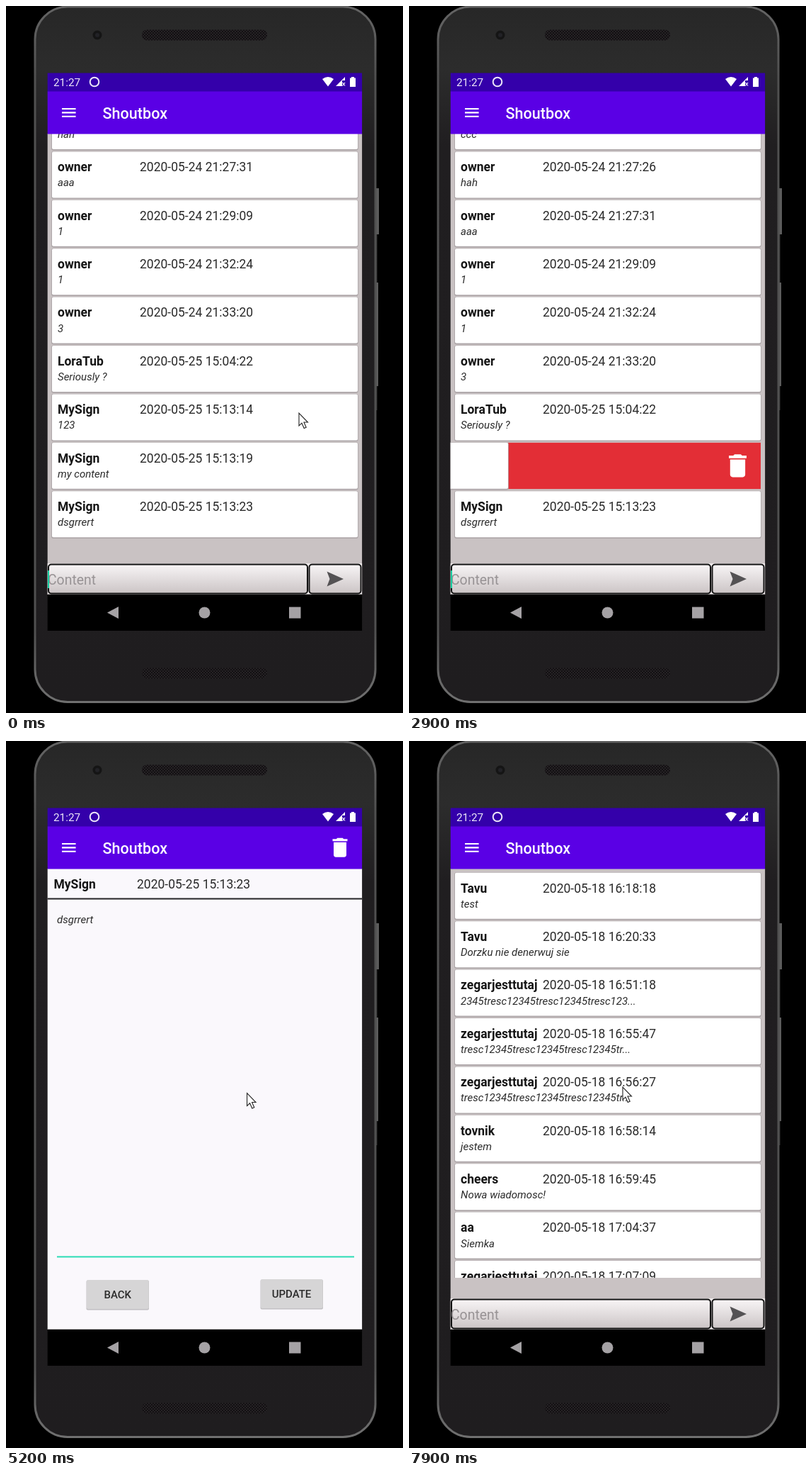
Recreate the animation shown at these times as an HTML page. Size 561 px wide and 997 px high, loop 8 s.

```html
<!DOCTYPE html>
<html lang="en">
<head>
<meta charset="utf-8">
<title>Shoutbox</title>
<style>
  html, body { margin: 0; width: 100%; height: 100%; overflow: hidden; background: #000; }
  svg { display: block; width: 100%; height: 100%; }
  text { font-family: Roboto, sans-serif; white-space: pre; }
  .name { font-size: 17.5px; font-weight: 700; fill: #151515; }
  .date { font-size: 17.5px; fill: #2b2b2b; }
  .message { font-size: 15px; font-style: italic; fill: #2b2b2b; }
  .button { font-size: 15px; font-weight: 500; fill: #2b2b2b; text-anchor: middle; }
</style>
</head>
<body>
<svg viewBox="0 0 561 997">
  <defs>
    <linearGradient id="body" x2="0" y2="1">
      <stop stop-color="#272727"/><stop offset=".09" stop-color="#2c2c2c"/>
      <stop offset=".2" stop-color="#201e20"/><stop offset="1" stop-color="#1f1d1f"/>
    </linearGradient>
    <linearGradient id="rim" x2="0" y2="1">
      <stop stop-color="#646464"/><stop offset=".1" stop-color="#505050"/>
      <stop offset=".9" stop-color="#505050"/><stop offset="1" stop-color="#707070"/>
    </linearGradient>
    <linearGradient id="field" x2="0" y2="1">
      <stop stop-color="#f8f5f6"/><stop offset="1" stop-color="#cbc4c5"/>
    </linearGradient>
    <pattern id="mesh" width="4" height="4" patternUnits="userSpaceOnUse">
      <rect width="4" height="4" fill="#121012"/>
      <path d="M0 0L4 4M4 0L0 4" stroke="#2b272a" stroke-width=".8"/>
    </pattern>
    <clipPath id="listArea"><rect x="58.7" y="180" width="444.4" height="577"/></clipPath>
    <path id="trash" fill="#fff" d="M6 19c0 1.1.9 2 2 2h8c1.1 0 2-.9 2-2V7H6zM19 4h-3.5l-1-1h-5l-1 1H5v2h14z"/>
  </defs>

  <!-- Phone -->
  <rect width="561" height="997"/>
  <path d="M525 257v65M524 390v146" stroke="#5c5c5c" stroke-width="4"/>
  <path d="M523.5 322v68M523.5 536v34" stroke="#353535" stroke-width="2"/>
  <rect x="41" y="1" width="481" height="980.5" rx="46" fill="url(#body)" stroke="url(#rim)" stroke-width="3"/>
  <circle cx="129" cy="41" r="6.5" fill="#151515"/>
  <circle cx="129" cy="41" r="3" fill="#222226"/>
  <rect x="192" y="33.5" width="177" height="15" rx="7" fill="url(#mesh)"/>
  <rect x="192" y="933.5" width="177" height="15" rx="7" fill="url(#mesh)"/>

  <!-- Chat list -->
  <g id="listScreen">
    <rect x="58.7" y="180" width="444.4" height="650" fill="#c9c2c3"/>
    <g clip-path="url(#listArea)"><g id="chat"></g><g id="archive"></g></g>
    <rect x="58.7" y="786" width="444.4" height="44" fill="#eee9ea"/>
    <g fill="url(#field)" stroke="#111" stroke-width="2">
      <rect x="60" y="787.5" width="366" height="41" rx="4"/>
      <rect x="428.5" y="787.5" width="73" height="41" rx="4"/>
    </g>
    <text x="59" y="815.5" font-size="19.4" fill="#989395">Content</text>
    <rect id="fieldCaret" x="59" y="796" width="2" height="25" fill="#18cda0"/>
    <path fill="#545254" d="M453.5 797.5L477 808 453.5 818.5 457.5 808Z"/>
  </g>

  <!-- Message editor -->
  <g id="editScreen">
    <rect x="58.7" y="180" width="444.4" height="650" fill="#faf8fc"/>
    <text class="name" x="67.5" y="208">MySign</text>
    <text class="date" x="185" y="208">2020-05-25 15:13:23</text>
    <rect x="58.7" y="221.5" width="444.4" height="2" fill="#252427"/>
    <text class="message" x="72" y="257">dsgrrert</text>
    <rect id="editCaret" x="123.5" y="240" width="2.2" height="22" fill="#1fd3ac"/>
    <rect x="72" y="726.4" width="420" height="2" fill="#2bdcb5"/>
    <g fill="#c2c0c3">
      <rect x="113.5" y="760.5" width="88.5" height="42" rx="2"/>
      <rect x="359.5" y="759.5" width="88.5" height="42" rx="2"/>
    </g>
    <g fill="#d6d5d6">
      <rect x="114" y="760" width="87.5" height="41" rx="2"/>
      <rect x="360" y="759" width="87.5" height="41" rx="2"/>
    </g>
    <text class="button" x="157.7" y="785.5">BACK</text>
    <text class="button" x="403.5" y="784.5">UPDATE</text>
  </g>

  <!-- Status, app and navigation bars -->
  <rect x="58.7" y="94.5" width="444.4" height="26.5" fill="#3400aa"/>
  <rect x="58.7" y="120.5" width="444.4" height="60" fill="#5a00e5"/>
  <g fill="#fff">
    <text x="67" y="113" font-size="15.3" fill="#ece6f8">21:27</text>
    <circle cx="125" cy="107" r="6.3" fill="none" stroke="#ece6f8" stroke-width="2"/>
    <path d="M447 103Q455 97 463 103L455 113.5Z"/>
    <path d="M479 100v5h-4v8h-9z"/>
    <path d="M475.5 108l3.5 4.5M479 108l-3.5 4.5" stroke="#fff" stroke-width="1.2"/>
    <path d="M488 100h4v1.5h2v12.5h-8v-12.5h2z"/>
    <path d="M79 145h19.6M79 150.4h19.6M79 155.8h19.6" stroke="#fff" stroke-width="2.1"/>
    <text x="136.5" y="158.7" font-size="21.6" font-weight="500">Shoutbox</text>
  </g>
  <use id="barTrash" href="#trash" transform="translate(454 132.2) scale(1.5)"/>
  <rect x="58.7" y="829.7" width="444.4" height="51.3"/>
  <g fill="#a5a2a5">
    <path d="M143 855.5L159 847v17z"/>
    <circle cx="280.5" cy="855.5" r="8"/>
    <rect x="400" y="847.5" width="16.5" height="16"/>
  </g>

  <path id="cursor" d="M0 0V18L4 14.2 7.2 21.5 10.2 20.2 7 13H12.5Z" fill="#fff" stroke="#222" stroke-width="1.1"/>
</svg>

<script>
const LOOP = 8000, PITCH = 68.4, LAST_TOP = 684.2, FIRST_TOP = 185.8;
const OPEN_EDITOR = 4400, CLOSE_EDITOR = 6700, ARCHIVE_LOADED = 6900;
const $ = id => document.getElementById(id);

const chatRows = [
  ['owner', '2020-05-24 21:25:40', '2'],
  ['owner', '2020-05-24 21:26:13', 'ccc'],
  ['owner', '2020-05-24 21:27:26', 'hah'],
  ['owner', '2020-05-24 21:27:31', 'aaa'],
  ['owner', '2020-05-24 21:29:09', '1'],
  ['owner', '2020-05-24 21:32:24', '1'],
  ['owner', '2020-05-24 21:33:20', '3'],
  ['LoraTub', '2020-05-25 15:04:22', 'Seriously ?'],
  ['MySign', '2020-05-25 15:13:14', '123'],
  ['MySign', '2020-05-25 15:13:19', 'my content'],
  ['MySign', '2020-05-25 15:13:23', 'dsgrrert'],
];
const archiveRows = [
  ['Tavu', '2020-05-18 16:18:18', 'test'],
  ['Tavu', '2020-05-18 16:20:33', 'Dorzku nie denerwuj sie'],
  ['zegarjesttutaj', '2020-05-18 16:51:18', '2345tresc12345tresc12345tresc123...'],
  ['zegarjesttutaj', '2020-05-18 16:55:47', 'tresc12345tresc12345tresc12345tr...'],
  ['zegarjesttutaj', '2020-05-18 16:56:27', 'tresc12345tresc12345tresc12345tr...'],
  ['tovnik', '2020-05-18 16:58:14', 'jestem'],
  ['cheers', '2020-05-18 16:59:45', 'Nowa wiadomosc!'],
  ['aa', '2020-05-18 17:04:37', 'Siemka'],
  ['zegarjesttutaj', '2020-05-18 17:07:09', 'test'],
];

// Each swiped row: its index, drag track [time, dx] and the time the gap starts to close.
const swipes = [
  { row: 8, drag: [[1200, 0], [1550, -250], [1750, -444]], close: 1857 },
  { row: 9, drag: [[2450, 0], [2900, -357], [3000, -444]], close: 3100 },
];
const cursorTrack = [
  [0, 414, 574], [1000, 352, 565], [1200, 352, 566], [1550, 102, 572],
  [1900, 275, 625], [2450, 430, 645], [2900, 73, 648], [3300, 150, 690],
  [4200, 256, 718], [4600, 256, 718], [6000, 473, 150], [6800, 473, 150],
  [7600, 344, 269], [7900, 302, 488],
];

const clamp = p => Math.min(1, Math.max(0, p));
const ease = p => (1 - Math.cos(Math.PI * clamp(p))) / 2;
const move = (node, x, y) => node.setAttribute('transform', `translate(${x} ${y})`);
const show = (node, on) => node.setAttribute('visibility', on ? 'inherit' : 'hidden');

function sample(track, t) {
  const next = track.findIndex(key => key[0] > t);
  if (next === 0) return track[0].slice(1);
  if (next < 0) return track.at(-1).slice(1);
  const [from, to] = [track[next - 1], track[next]];
  const p = ease((t - from[0]) / (to[0] - from[0]));
  return from.slice(1).map((value, i) => value + (to[i + 1] - value) * p);
}

const card = ([name, date, message], i) => `
  <g transform="translate(0 ${FIRST_TOP + i * PITCH})">
    <g class="swipe" visibility="hidden">
      <rect class="red" x="497" width="0" height="65.3" fill="#e32e36"/>
      <use href="#trash" transform="translate(443.1 11.2) scale(1.78)"/>
    </g>
    <g class="card">
      <rect x="64" y="-.5" width="433.8" height="67.2" rx="3" fill="#aea7a9"/>
      <rect x="65" width="432" height="65" rx="2" fill="#fff"/>
      <text class="name" x="73" y="27.8">${name}</text>
      <text class="date" x="189" y="27.8">${date}</text>
      <text class="message" x="73" y="49">${message}</text>
    </g>
  </g>`;

$('chat').innerHTML = chatRows.map(card).join('');
$('archive').innerHTML = archiveRows.map(card).join('');
const chatNodes = [...$('chat').children];

function drawChat(t) {
  const closed = swipes.reduce((sum, s) => sum + ease((t - s.close) / 200), 0);
  chatNodes.forEach((node, i) => {
    const shift = i < swipes[0].row ? closed : 0;
    move(node, 0, LAST_TOP - (chatRows.length - 1 - i - shift) * PITCH);
  });
  for (const { row, drag, close } of swipes) {
    const node = chatNodes[row];
    const [dx] = sample(drag, t);
    const red = Math.min(432, -dx);
    show(node, t < close);
    show(node.querySelector('.swipe'), dx < -45);
    const strip = node.querySelector('.red');
    strip.setAttribute('x', 497 - red);
    strip.setAttribute('width', red);
    move(node.querySelector('.card'), dx, 0);
  }
}

function draw(t) {
  const editing = t >= OPEN_EDITOR && t < CLOSE_EDITOR;
  const caretOn = (t + 100) % 500 < 250;
  show($('listScreen'), !editing);
  show($('editScreen'), editing);
  show($('barTrash'), editing);
  show($('chat'), t < OPEN_EDITOR);
  show($('archive'), t >= ARCHIVE_LOADED);
  show($('fieldCaret'), caretOn && t < OPEN_EDITOR);
  show($('editCaret'), caretOn && editing);
  drawChat(t);
  move($('cursor'), ...sample(cursorTrack, t));
  show($('cursor'), t < 2850 || t > 3050);
}

function frame() {
  draw(performance.now() % LOOP);
  requestAnimationFrame(frame);
}
frame();
</script>
</body>
</html>
```
